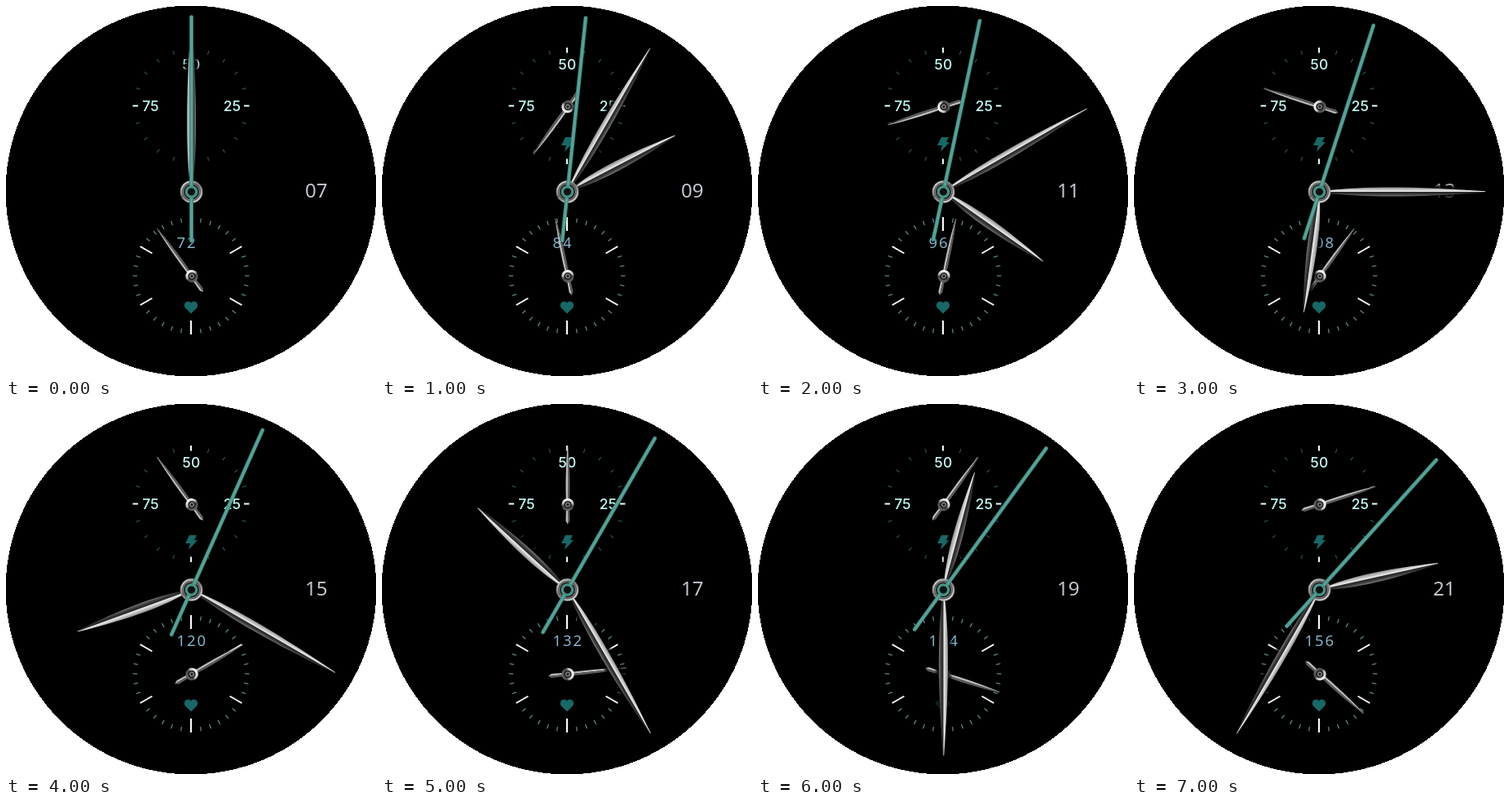
An HTML page that plays this animation: 454x454 px, repeating every 8000 ms.

```html
<!DOCTYPE html>
<html lang="en">
<head>
<meta charset="utf-8">
<title>Watch face</title>
<style>
html, body { margin: 0; width: 100%; height: 100%; overflow: hidden; background: #fff; }
svg { display: block; width: 100vw; height: 100vh; }
.scale { font: 500 17.5px Inter, Roboto, sans-serif; fill: #c4fbf5; text-anchor: middle; }
.date { font: 24px "Noto Sans", "Open Sans", sans-serif; fill: #c3c5cf; }
.pulse { font: 18.5px "Noto Sans", "Open Sans", sans-serif; letter-spacing: 1.9px; fill: #84b4c8; }
</style>
</head>
<body>
<svg viewBox="0 0 454 454">
  <defs>
    <linearGradient id="light"><stop offset="0" stop-color="#8a8a8a"/><stop offset=".5" stop-color="#c4c4c4"/><stop offset="1" stop-color="#f2f2f2"/></linearGradient>
    <linearGradient id="dark"><stop offset="0" stop-color="#222"/><stop offset=".5" stop-color="#3c3c3c"/><stop offset="1" stop-color="#777"/></linearGradient>
    <linearGradient id="metal" x2=".7" y2="1"><stop offset="0" stop-color="#eee"/><stop offset=".5" stop-color="#777"/><stop offset="1" stop-color="#ccc"/></linearGradient>
    <linearGradient id="sheen" x2="0" y2="1"><stop offset="0" stop-color="#fff"/><stop offset=".4" stop-color="#bbb"/><stop offset=".6" stop-color="#444"/><stop offset="1" stop-color="#666"/></linearGradient>
    <filter id="soft" filterUnits="userSpaceOnUse" x="-30" y="-230" width="60" height="250"><feGaussianBlur stdDeviation="1.6"/></filter>
  </defs>
  <circle cx="227" cy="227" r="227.5" shape-rendering="crispEdges"/>
  <g id="ticks"></g>
  <g class="scale">
    <text x="227.3" y="78">50</text>
    <text x="277.5" y="129">25</text>
    <text x="177.5" y="129">75</text>
  </g>
  <path d="M225 161h9l-3 6h4l-11 12 2-8h-6z" fill="#176866"/>
  <path d="M227 377.500l-7-7c-4-5 3-11 7-6 4-5 11 1 7 6z" fill="#176866"/>
  <text class="date" id="date" x="367" y="235"></text>
  <text class="pulse" id="pulse" x="209.500" y="297.300"></text>
  <g id="hands"></g>
</svg>
<script>
const $ = id => document.getElementById(id);

function ticks(cx, cy, step, r1, r2, color, width) {
  let s = '';
  for (let a = 0; a < 360; a += step)
    s += `<path d="M0 ${-r1}V${-r2}" transform="translate(${cx} ${cy}) rotate(${a})" stroke="${color}" stroke-width="${width}"/>`;
  return s;
}

$('ticks').innerHTML =
  ticks(227, 122.5, 18, 66, 71, '#29504c', 1.2) +
  ticks(227, 122.5, 90, 65, 71.500, '#e4fffb', 2) +
  ticks(227, 331, 10, 66, 71.500, '#5f8580', 1.3) +
  ticks(227, 331, 60, 55, 72, '#fff', 2);

// Tapered blade pointing up; the left face catches the light
function blade(len, w) {
  const side = s => `M0-8L${s * 1.5}-8C${s * w} ${-len * .3} ${s * w * .85} ${-len * .6} ${s * .7} ${-len}L0 ${-len}`;
  return `<path d="${side(-1)}Z${side(1)}Z" stroke="#000" stroke-width="8" opacity=".85" filter="url(#soft)"/>
    <path d="${side(1)}Z" fill="url(#dark)"/><path d="${side(-1)}Z" fill="url(#light)"/>`;
}

const needle = `
  <path d="M0 24L-2.500 20-2 0Q-3.500-32-.6-72H0Z" fill="#bbb"/>
  <path d="M0 24L2.500 20 2 0Q3.500-32 .6-72H0Z" fill="#5c5c5c"/>
  <circle r="7.700" fill="url(#sheen)"/><circle r="4.600" fill="#181818"/>
  <circle r="3" fill="#8a8a8a"/><circle r="1.700" fill="#222"/>`;
const hub = `<circle r="13.800" fill="url(#metal)"/><circle r="11.300" fill="#4a4a4a"/>
  <circle r="10" fill="#222" stroke="#888" stroke-width="1"/>`;
const sweep = `<path d="M0-214.500V-6M0 6V60" stroke="#39776f" stroke-width="5" stroke-linecap="round"/>
  <path d="M0-214.500V-6M0 6V60" stroke="#52a598" stroke-width="3.200" stroke-linecap="round"/>
  <circle r="6.200" fill="#111" stroke="#459286" stroke-width="3.200"/>`;

// x, y, start angle, degrees per step, moving part, fixed cap
const parts = [
  [228, 123.5, 180, 36, needle, ''],
  [228, 331.5, -36, 24, needle, ''],
  [227.5, 228, 0, 62.5, blade(149, 8.2), ''],
  [227.5, 228, 0, 30, blade(203.5, 7.6), hub],
  [227.5, 228, 0, 6, sweep, '']
];

$('hands').innerHTML = parts.map(([x, y, , , moving, cap]) =>
  `<g transform="translate(${x} ${y})"><g class="turn">${moving}</g>${cap}</g>`).join('');
const turns = document.querySelectorAll('.turn');

let shown = -1;
function draw(now) {
  const k = Math.floor(now % 8000 / 1000);
  if (k !== shown) {
    shown = k;
    parts.forEach(([, , from, by], i) => turns[i].setAttribute('transform', `rotate(${from + by * k})`));
    $('date').textContent = String(7 + 2 * k).padStart(2, '0');
    $('pulse').textContent = 72 + 12 * k;
  }
}

const start = performance.now();
function loop() {
  draw(performance.now() - start);
  requestAnimationFrame(loop);
}
loop();
</script>
</body>
</html>
```
